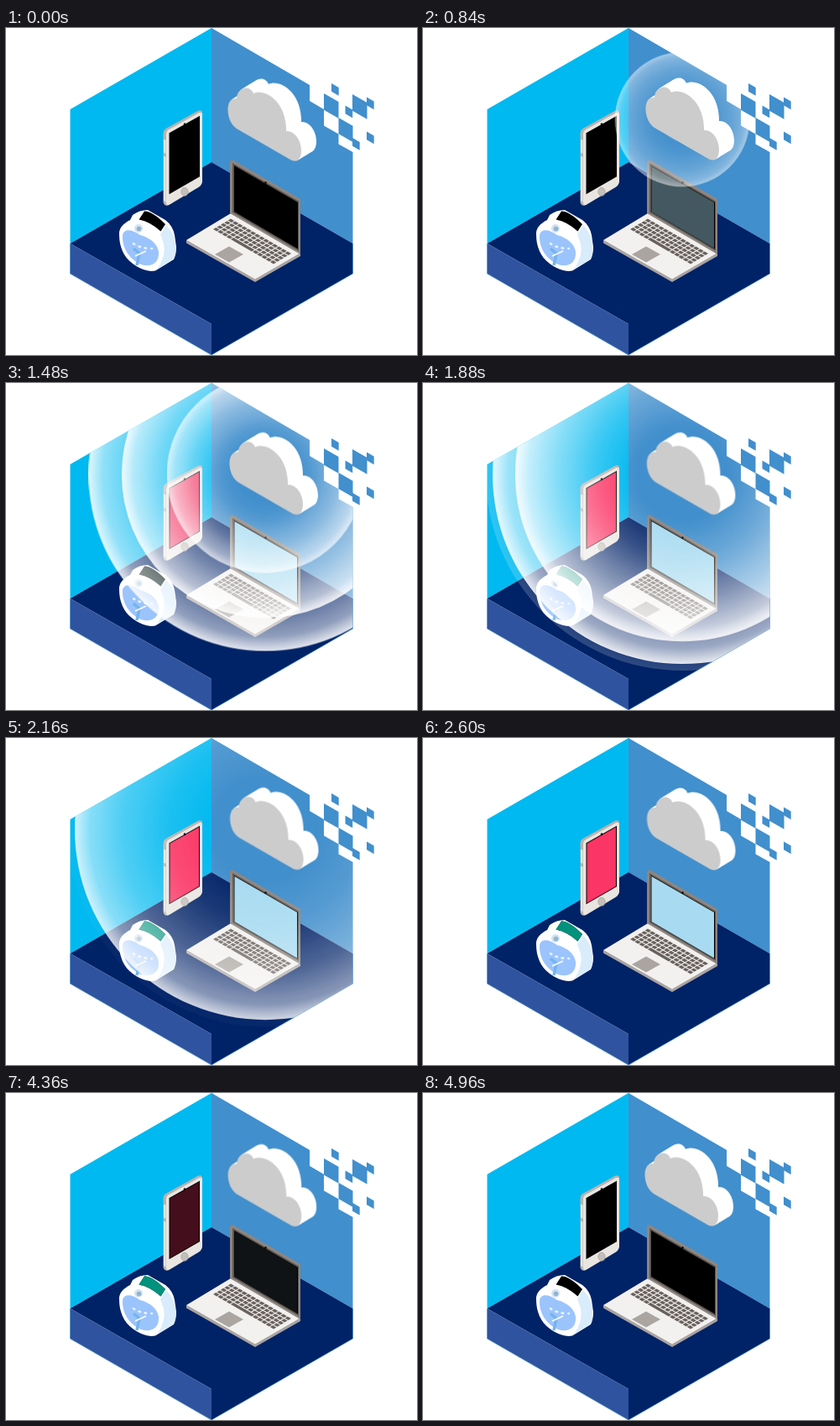
Animation, 490 px wide and 390 px high, one loop 5 s. Source, as an HTML page:

```html
<!DOCTYPE html>
<html lang="en">
<head>
<meta charset="utf-8">
<title>Connected devices</title>
<style>
  html, body { margin: 0; width: 100%; height: 100%; overflow: hidden; background: #fff; }
  svg { display: block; width: 490px; height: 390px; }
</style>
</head>
<body>
<svg viewBox="0 0 490 390" xmlns="http://www.w3.org/2000/svg">
  <defs>
    <radialGradient id="glow">
      <stop offset=".25" stop-color="#fff" stop-opacity="0"/>
      <stop offset=".5" stop-color="#fff" stop-opacity=".12"/>
      <stop offset=".75" stop-color="#fff" stop-opacity=".33"/>
      <stop offset=".92" stop-color="#fff" stop-opacity=".57"/>
      <stop offset="1" stop-color="#fff" stop-opacity=".88"/>
    </radialGradient>
    <clipPath id="room">
      <path d="M245 0L362 68V87L379 97V116.500L396.500 126.500V138.500L413.500 148V293L245 390L76.500 293V97Z"/>
    </clipPath>
    <path id="puff" d="M264.5 98C264 88 268 82 275 83C275 75 281 70 287 70.5C291 71 294 74 295 77C302 73 314 77 322 86C330 95 334 107 334 122C343 121 352 132 352 145C352 155 347 160 340 156.500L275 119C268 114 265 106 264.500 98Z"/>
  </defs>

  <!-- room -->
  <path fill="#00b9f0" d="M245 0V160L76.500 257V97Z"/>
  <path fill="#418fcd" d="M245 0L362 68V87L379 97V116.500L396.500 126.500V138.500L413.500 148V257L245 160Z"/>
  <path fill="#002267" d="M245 160L413.500 257V293L245 390V353L76.500 257Z"/>
  <path fill="#2f539e" d="M76.500 257L245 353V390L76.500 293Z"/>
  <path fill="none" stroke="#418fcd" stroke-width=".7" d="M76.500 257V293L245 390L413.500 293V257"/>
  <g id="pixels" fill="#418fcd"></g>

  <!-- phone -->
  <g transform="translate(0 .8)">
    <path fill="#b9b3ad" d="M187.500 125Q187.500 121 191 119L229 98Q234 96 234 101V181Q234 186 230 189L195 210Q189 213 187.500 207Z"/>
    <path fill="#e9e6e2" d="M191 126Q191 122 194 120.500L230 100.500Q234 98.500 234 103V181Q234 186 230 188.500L195 209.500Q191 212 191 207Z"/>
    <path fill="#e9e6e2" d="M188 132l2.500 1v16l-2.500-1zM188 152l2.500 1v54l-2.500-2z"/>
    <path d="M194.500 124.500L231 104V176.500L194.500 197.500Z"/>
    <path id="phone" fill="#fb3565" d="M195.500 125L230 105.500V176L195.500 196Z"/>
    <ellipse cx="213" cy="114" rx="1.300" ry="1.600"/>
    <ellipse cx="213" cy="194.500" rx="4.200" ry="5" fill="#c4bfba" stroke="#aaa39d" stroke-width=".7"/>
  </g>

  <!-- laptop -->
  <g>
    <path fill="#aaa39e" d="M215 253L297 299L351 268.500V272L297 303L215 256.500Z"/>
    <path fill="#f3f1ef" d="M268 221L351 268.500L297 299.500L215 253Z"/>
    <path fill="#8d8681" d="M267 159L270 157L351 204V270L267 221Z"/>
    <path fill="#5d5753" d="M270 161L349 206.500V266L270 220Z"/>
    <path d="M272 164L348 208V263.500L272 219Z"/>
    <path id="laptop" fill="#a8dbf1" d="M272.500 165L347 208V262.500L272.500 219Z"/>
    <circle cx="309.500" cy="184.500" r="1.200"/>
    <g id="keys" fill="#68615d" transform="matrix(5.214 3 -4.400 2.600 268 227)"></g>
    <path fill="#aaa5a0" d="M266 260.500L283 270L266 279.500L249 270Z"/>
  </g>

  <!-- watch -->
  <g>
    <path fill="#fff" d="M135 247C134 239 140 233 148 229L151 223Q159 217 169 217L190 229Q199 236 201 247L203 261Q203 270 200 276L178 289.500C170 291 160 288 151 281C140 273 135 260 135 247Z"/>
    <path fill="#d9ecfb" d="M184 246L191 235Q200 244 202 258Q204 268 199 276L180 288Q191 272 188 257Z"/>
    <path fill="#9bc4fc" d="M139 247C141 239 150 240 160 247C172 250 181 258 182 267C183 281 172 286 161 282C147 276 138 262 139 247Z"/>
    <path fill="none" stroke="#e8f3ff" stroke-width="2.600" stroke-linecap="round" stroke-dasharray="1.500 6" d="M152 257Q160 263 174 263"/>
    <path fill="none" stroke="#74b4ee" stroke-width="3.500" d="M152 263L159 269L156 283"/>
    <path fill="none" stroke="#fff" stroke-width="1.500" d="M154 272L167 266"/>
    <circle cx="158" cy="239" r="5" fill="#d5e2ee"/>
    <circle cx="158.500" cy="239.500" r="2.800" fill="#8fb4d4"/>
    <path d="M158.500 228.500L165 218.500Q174 218 190 234L184.500 242.500Q172 231 158.500 228.500Z"/>
    <path id="watch" fill="#00927c" d="M158.500 228.500L165 218.500Q174 218 190 234L184.500 242.500Q172 231 158.500 228.500Z"/>
  </g>

  <g clip-path="url(#room)"><g id="waves" transform="translate(309 109)"></g></g>
  <g id="cloud"></g>
</svg>
<script>
const LOOP = 5000;
const $ = id => document.getElementById(id);

function add(parent, tag, attrs) {
  const el = document.createElementNS('http://www.w3.org/2000/svg', tag);
  for (const k in attrs) el.setAttribute(k, attrs[k]);
  return parent.appendChild(el);
}

// steps: [ms, value] pairs, held before the first and after the last
function play(el, prop, steps, show = v => v) {
  const all = [[0, steps[0][1]], ...steps, [LOOP, steps[steps.length - 1][1]]];
  el.animate(all.map(([t, v]) => ({ offset: t / LOOP, [prop]: show(v) })),
    { duration: LOOP, iterations: Infinity });
}

// loose isometric wall tiles: x, y, size
[[379, 78, 17.5], [396.5, 107, 17], [413, 79, 17.5], [388, 66, 8.7], [430, 82.5, 8.7],
 [404.5, 92.5, 8.7], [413, 131, 8.7], [430, 123.5, 8.7]].forEach(([x, y, s]) =>
  add($('pixels'), 'path', { d: `M${x} ${y}l${s} ${s * .577}v${s * 1.13}l${-s} ${-s * .577}z` }));

// keyboard with a space bar in the front row
for (let row = 0; row < 5; row++) {
  for (let col = 0; col < 14; col++) {
    const space = row === 4 && col === 4;
    add($('keys'), 'rect', { x: col + .1, y: row + .12, width: space ? 4.8 : .8, height: .76 });
    if (space) col += 4;
  }
}

// cloud: extruded white sides, grey front
for (let i = 18; i >= 0; i--) {
  add($('cloud'), 'use', { href: '#puff', x: i, y: -i * .61, fill: i ? '#fff' : '#ccc' });
}
const wave = (t, peak) => Math.cos((t - peak) / LOOP * 2 * Math.PI);
const drift = Array.from({ length: 26 }, (_, i) => [i * 200, i * 200]);
play($('cloud'), 'transform', drift, t =>
  `translate(${1.3 + 1.3 * wave(t, 2300)}px, ${.5 + 1.1 * wave(t, 4200)}px)`);

// ripples
const radius = [[500, 0], [660, 38], [840, 80], [1120, 145], [1250, 171], [1400, 199],
  [1480, 210.5], [1650, 226], [1880, 234], [2000, 237]];
const fade = [[540, 0], [840, .6], [1150, 1], [1660, 1], [1940, 0]];
for (const delay of [0, 230, 480]) {
  const disc = add($('waves'), 'circle', { r: 100, fill: 'url(#glow)' });
  const later = steps => steps.map(([t, v]) => [t + delay, v]);
  play(disc, 'transform', later(radius), r => `scale(${r / 100})`);
  play(disc, 'opacity', later(fade));
}

// screens: on from, on to, off from, off to
const screens = { laptop: [600, 1200, 3960, 4400], phone: [1000, 1500, 4050, 4480], watch: [1400, 1900, 4480, 4900] };
for (const id in screens) {
  play($(id), 'opacity', screens[id].map((t, i) => [t, i === 1 || i === 2 ? 1 : 0]));
}
</script>
</body>
</html>
```
